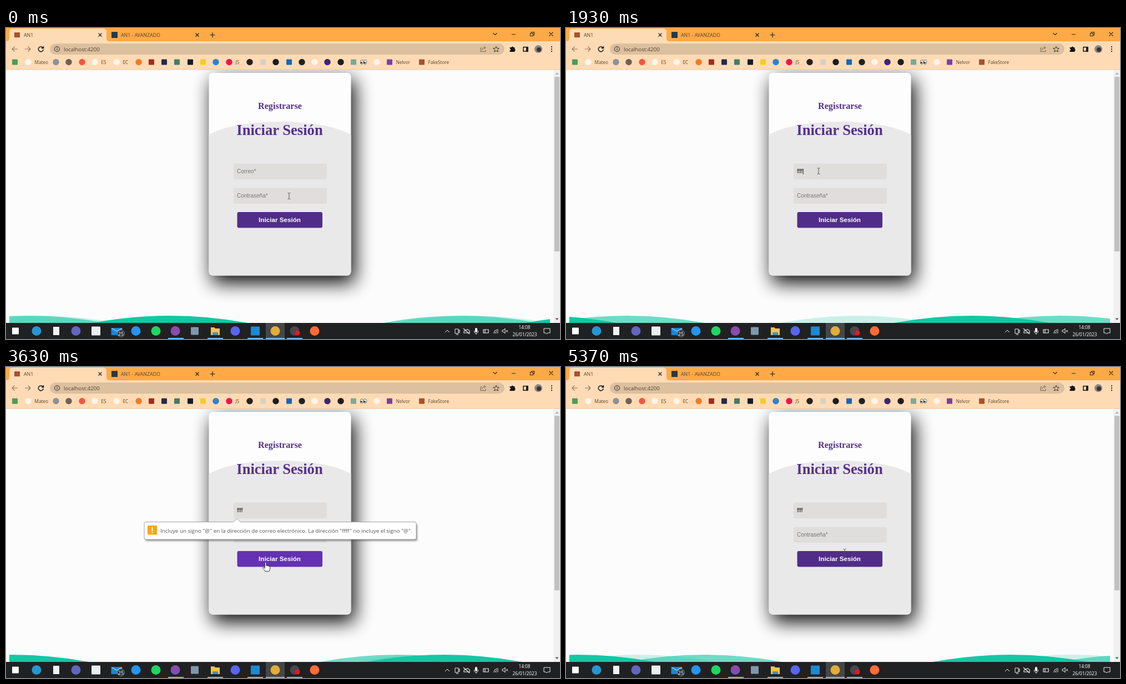
These frames come from a looping animation (998x561 px, 5.41 s). An HTML page:

```html
<!DOCTYPE html>
<html lang="es">
<head>
<meta charset="utf-8">
<title>Iniciar Sesión</title>
<style>
html, body { margin: 0; width: 100%; height: 100%; overflow: hidden; background: #fcfcfc; }
svg { display: block; width: 100vw; height: 100vh; }
text { font-family: "Open Sans", "Noto Sans", sans-serif; white-space: pre; }
.serif { font: bold 16.2px "Liberation Serif", "Times New Roman", serif; fill: #55308b; text-anchor: middle; }
.arial { font: 10px "Liberation Sans", Arial, sans-serif; }
.line { fill: none; stroke: #3b3025; stroke-width: 1.2; }
.tray { fill: none; stroke: #eee; stroke-width: 1; }
</style>
</head>
<body>
<svg viewBox="0 0 998 561">
  <defs>
    <filter id="blur" x="-30%" y="-30%" width="160%" height="160%"><feGaussianBlur stdDeviation="17"/></filter>
    <filter id="soft" x="-5%" y="-20%" width="110%" height="150%"><feGaussianBlur stdDeviation="1.5"/></filter>
    <clipPath id="card"><rect x="365.5" y="81" width="256" height="365.5" rx="7"/></clipPath>
    <clipPath id="sea"><rect x="6" y="518" width="974" height="14"/></clipPath>
  </defs>

  <!-- page -->
  <rect width="998" height="561" fill="#fcfcfc"/>
  <rect x="371" y="93" width="257" height="367" rx="7" filter="url(#blur)" opacity=".96"/>
  <g clip-path="url(#card)">
    <rect x="365" y="81" width="257" height="366" fill="#fdfdfd"/>
    <path d="M365 193C392 177 440 169 493 169S595 177 622 193V447H365Z" fill="#e9e9e9"/>
  </g>
  <text class="serif" x="493.5" y="146">Registrarse</text>
  <text class="serif" x="493" y="193" style="font-size:26.6px">Iniciar Sesión</text>
  <g fill="#dfdedd">
    <rect x="410" y="244.5" width="168" height="28.5" rx="2"/>
    <rect x="410" y="288.5" width="168" height="28.5" rx="2"/>
  </g>
  <text class="arial" id="mail" x="416" y="262"></text>
  <path id="caret" d="M.5 254v10" stroke="#444"/>
  <text class="arial" x="416" y="306" fill="#777">Contraseña*</text>
  <rect id="button" x="416.5" y="332" width="153.5" height="28.5" rx="3"/>
  <text class="arial" x="493" y="350" text-anchor="middle" fill="#fff" style="font-weight:bold;font-size:11.7px">Iniciar Sesión</text>
  <g id="waves" fill="#12c8a3" clip-path="url(#sea)">
    <path opacity=".22"/><path opacity=".6"/><path/>
  </g>
  <rect x="986" y="75" width="12" height="457" fill="#f1f1f1"/>
  <rect x="988" y="88" width="9" height="315" fill="#c1c1c1"/>
  <path d="M989.5 84l3-3.5 3 3.5z" fill="#a5a5a5"/>
  <path d="M989.5 523.500l3 3.500 3-3.500z" fill="#555"/>

  <!-- suggestions -->
  <g id="list">
    <path d="M481 280.500H485L493.500 274.500 502 280.500H631.500q3 0 3 3V439.500q0 3-3 3H481q-3 0-3-3V283.500q0-3 3-3z" fill="#3c3d3d" opacity=".95"/>
  </g>

  <!-- validation bubble -->
  <g id="bubble">
    <rect x="251" y="283" width="490" height="31" rx="3" fill="#444" opacity=".5" filter="url(#soft)"/>
    <path d="M252 279.500H409.500L416 273.500 422.500 279.500H736q3 0 3 3V308q0 3-3 3H252q-3 0-3-3V282.500q0-3 3-3z" fill="#fff" stroke="#8b8b8b" stroke-width=".8"/>
    <rect x="255" y="286" width="17" height="16.500" rx="1" fill="#f6a51c"/>
    <path d="M263.500 288.500v7.500M263.500 297.800v2" stroke="#fff" stroke-width="2"/>
    <text x="278" y="299" font-size="9.8" fill="#555">Incluye un signo "@" en la dirección de correo electrónico. La dirección "ffff" no incluye el signo "@".</text>
  </g>

  <!-- browser -->
  <rect width="998" height="25" fill="#ffa947"/>
  <rect y="24" width="998" height="51" fill="#ffdbb5"/>
  <path d="M0 24q6 0 6-6V7q0-6 6-6H175q6 0 6 6V18q0 6 6 6z" fill="#ffdbb5"/>
  <path d="M0 75h998" stroke="#e9c5a0"/>
  <rect x="79" y="28" width="819" height="20" rx="10" fill="#dcc09f"/>
  <g font-size="8.8" fill="#54432f">
    <text x="32" y="15.500">AN1</text>
    <text x="207" y="15.500">AN1 - AVANZADO</text>
    <text x="104" y="41.500" font-size="9.6">localhost:4200</text>
  </g>
  <rect x="15" y="8" width="10" height="9" fill="#a9512f"/>
  <rect x="190" y="7" width="11" height="11" fill="#273a48"/>
  <g class="line">
    <path d="M166.500 9.500l6 6m0-6l-6 6M341.500 9.500l6 6m0-6l-6 6M367.500 12.500h9m-4.500-4.500v9" stroke="#222"/>
    <path d="M877.500 9l3.500 3.500 3.500-3.500M911 11.500h7M944.500 9.500h5v5h-5zM946.500 9.500v-2h5v5h-2M978.500 7.500l7 7m0-7l-7 7"/>
    <path d="M21 38H11m4.500-4.500L11 38l4.500 4.500M34 38h10m-4.500-4.500L44 38l-4.500 4.500" stroke="#8c7559"/>
    <path d="M66.500 35.500a4.500 4.500 0 1 0 .8 3.500M67.500 33v3.500H64" stroke="#111" stroke-width="1.500"/>
    <circle cx="92" cy="38" r="4.500"/><path d="M92 37v3.500M92 35v1.200"/>
    <path d="M857 36h-2v6.500h9v-3M857.500 40q0-4.500 6-4.500m-2.500-2.500l3 2.500-3 2.500" stroke="#78654f" stroke-width="1"/>
    <path d="M883 33l1.500 3.500 3.700.3-2.800 2.500.9 3.700-3.300-2-3.300 2 .9-3.700-2.800-2.500 3.700-.3z" stroke-width="1"/>
    <path d="M932 34.500h8v7.500h-8z" stroke="#111" stroke-width="1.500"/>
  </g>
  <path d="M907.500 35h3a1.800 1.800 0 0 1 3.500 0h2.500v3a1.700 1.700 0 0 1 0 3.200v1.800h-9v-2.500a1.700 1.700 0 0 0 0-3.400zM937 34h3.500v8.500H937z" fill="#111"/>
  <circle cx="959" cy="38" r="7" fill="#8d8580"/><circle cx="960" cy="39" r="4" fill="#37313a"/>
  <path d="M983 33v2m0 2v2m0 2v2" stroke="#222" stroke-width="2"/>
  <g id="marks" font-size="8.2" fill="#54432f"></g>

  <!-- taskbar -->
  <rect y="532" width="998" height="29" fill="#202122"/>
  <rect x="468" y="532" width="34" height="29" fill="#454748"/>
  <g id="apps"></g>
  <path d="M292 560h28M363 560h28M435 560h28M468 560h34M506 560h28" stroke="#76b9ed" stroke-width="2"/>
  <path d="M190.500 542l9 5 9-5" fill="none" stroke="#d7efff"/>
  <circle cx="207" cy="551" r="6.500" fill="#303336" stroke="#aaa" stroke-width=".6"/>
  <text x="207" y="554.500" font-size="9" fill="#fff" text-anchor="middle">25</text>
  <circle cx="525" cy="550" r="4.500" fill="#f0151d"/>
  <g class="tray">
    <path d="M791 549l4-4 4 4M809 543h6v8h-6zM815 546l2-1.500v5l-2-1.500M811 553h4"/>
    <path d="M825 550q-1-4 3-4 2-4 5-1 3 0 2 5zM824 542l11 10M860 544h9v6h-9zM863 544v6" stroke-width="1.200"/>
    <path d="M879 551q0-7 8-7M881.500 551q0-4.500 5.500-4.500M884 551q0-2 3-2M894 545h2l3-3v9l-3-3h-2zM901 545l3 3.500m0-3.500l-3 3.500"/>
    <path d="M969 542h11v8h-4l-2 2-2-2h-3z"/>
    <path d="M843.500 546q0 5 3.500 5t3.500-5M847 551v2"/>
  </g>
  <rect x="845" y="541" width="4" height="8" rx="2" fill="#fff"/>
  <g font-size="8.3" fill="#fff" text-anchor="middle">
    <text x="934" y="542.500">14:08</text><text x="934.500" y="555.500">26/01/2023</text>
  </g>

  <!-- pointers -->
  <g id="pointer">
    <path d="M-2.500-5.500q2 0 2.500 1 .5-1 2.500-1M0-4.500v9M-2.500 5.500q2 0 2.500-1 .5 1 2.500 1" fill="none" stroke="#555"/>
    <path d="M-1.500 1q0-1.500 1.300-1.500t1.300 1.500v5q2-1 2.800.4 2-.6 2.400.8 1.800 0 1.800 1.800 0 4-2 7h-7q-1.500-3-4-5-1.500-2 .2-2.300 1.200 0 3.200 1.800z" fill="#fff" stroke="#222" stroke-width=".9"/>
    <path d="M0 0v12l2.800-2.500 2 4.500 1.800-.8-2-4.300h3.700z" fill="#fff" stroke="#222" stroke-width=".8"/>
  </g>
</svg>
<script>
const $ = id => document.getElementById(id);
const LOOP = 5410;

const badge = (x, y, r, color, square) => square
  ? `<rect x="${x - r}" y="${y - r}" width="${2 * r}" height="${2 * r}" rx="1" fill="${color}"/>`
  : `<circle cx="${x}" cy="${y}" r="${r}" fill="${color}"/>`;

// [x, colour, square, label]
$('marks').innerHTML = [
  [16, '#4d9b55', 1], [40, '#fff4e8', 0, 'Mateo'], [90, '#8b9299'], [113, '#6d625a'], [137, '#f2573f'],
  [160, '#fff4e8', 0, 'ES'], [199, '#fff4e8', 0, 'EC'], [239, '#f17b2b'], [262, '#a72822', 1],
  [285, '#242b4d', 1], [308, '#437b66', 1], [332, '#161d29', 1], [355, '#f2cf20', 1], [378, '#2d83cf'],
  [402, '#ee174d', 0, 'JS'], [439, '#24211f'], [463, '#d7d0c8', 1], [486, '#1d1d1f'],
  [510, '#1269bd', 1], [533, '#1b2523'], [556, '#fff4e8'], [579, '#3d2577'], [603, '#1d1d1f'],
  [626, '#74aa9c', 1], [668, '#fff4e8'], [691, '#7443a5', 1, 'Nelvor'], [749, '#a9512f', 1, 'FakeStore']
].map(([x, color, square, label]) => badge(x, 61.5, square ? 5 : 5.7, color, square) +
  (label ? `<text x="${x + 11.5}" y="64.5">${label}</text>` : '')).join('') +
  [641, 647].map(x => `<ellipse cx="${x}" cy="61.5" rx="2.6" ry="4" fill="#fff" stroke="#222" stroke-width=".7"/>` +
    badge(x - 0.7, 62.5, 1.5, '#222')).join('');

$('apps').innerHTML = [
  [17, '#fff', 1, 6], [55, '#2597d0'], [126, '#6266bd'], [162, '#e9eef2', 1, 8], [234, '#2496ed'],
  [270, '#1ed760'], [305, '#8b4bb0'], [340, '#7e98ad', 1, 7], [413, '#5865f2'], [449, '#1b8ad4', 1, 8],
  [485, '#e3ae36'], [520, '#48484b'], [556, '#ff6c37']
].map(([x, color, square, r = 8.5]) => badge(x, 546.5, r, color, square)).join('') +
  '<rect x="85" y="539" width="11" height="15" fill="#f2f2f2"/>' +
  '<rect x="189.5" y="541" width="20" height="13" fill="#1687d9"/>' +
  '<path d="M369 540h6l2 2h8v12h-16z" fill="#f6c344"/><path d="M372 549h10v5h-10z" fill="#3b8fd3"/>';

$('list').innerHTML += [
  'pabloandres.vega@orvu.test', 'pavegacastellano@orvik.test', 'tt@vu.test',
  'drtalulo@orvu.test', 'k@u.test', 'wplwp@kovmuna.test'
].map((s, i) => `<text x="487" y="${300 + 26 * i}" font-size="8.8" fill="#eee">${s}</text>`).join('');

const clamp = v => Math.max(0, Math.min(1, v));
const smooth = v => v * v * (3 - 2 * v);

// Values at time t from rows of [time, ...values]
function at(keys, t, ease = v => v) {
  const i = Math.max(1, keys.findIndex(k => k[0] >= t));
  const a = keys[i - 1], b = keys[i], p = ease(clamp((t - a[0]) / (b[0] - a[0])));
  return a.slice(1).map((v, n) => v + (b[n + 1] - v) * p);
}

const MOUSE = [[0, 510, 303], [150, 510, 303], [600, 453, 258], [1500, 453, 258], [1930, 455, 258],
  [2050, 455, 258], [2480, 483, 355], [2700, 483, 355], [3070, 482, 355], [3500, 482, 355],
  [4150, 348, 332], [4450, 348, 332], [5350, 502, 334], [LOOP, 502, 334]];
// Crest offsets of the pale, middle and strong waves
const SEA = [[0, 60, 820, 295], [1170, 190, 450, 670], [1930, 525, 110, 730], [2630, 600, 130, 1305],
  [3070, 690, 80, 1345], [4230, 860, -240, 1810], [5370, 910, -530, 2360], [LOOP, 915, -540, 2380]];
const PERIOD = 780;
const TYPED = [1130, 1290, 1420, 1550];

function wave(offset) {
  let d = '', c = ((offset % PERIOD) + PERIOD) % PERIOD - PERIOD;
  for (; c < 1140; c += PERIOD) d += `M${c - 140} 532Q${c} 506 ${c + 140} 532Z`;
  return d;
}

function draw(t) {
  at(SEA, t).forEach((offset, i) => $('waves').children[i].setAttribute('d', wave(offset)));

  const count = TYPED.filter(k => t >= k).length;
  $('mail').textContent = count ? 'f'.repeat(count) : 'Correo*';
  $('mail').setAttribute('fill', count ? '#222' : '#777');
  const caret = t < 2900 ? t > 650 && t < 2500 : t < 5000 && Math.floor((t - 2900) / 530) % 2 === 0;
  $('caret').setAttribute('opacity', +caret);
  $('caret').setAttribute('transform', `translate(${Math.floor(416 + count * 2.78)})`);

  $('list').setAttribute('opacity', clamp((t - 720) / 80) * clamp((1290 - t) / 90));

  const grow = 0.97 + 0.03 * smooth(clamp((t - 2920) / 245));
  $('bubble').setAttribute('opacity', clamp((t - 2920) / 120) * clamp((5300 - t) / 130));
  $('bubble').setAttribute('transform', `translate(493 280) scale(${grow} 1) translate(-493 -280)`);

  const [x, y] = at(MOUSE, t, smooth);
  const hover = x > 416 && x < 570 && y > 336 && y < 361;
  const field = x > 410 && x < 578 && (y > 244 && y < 273 || y > 288 && y < 336);
  const kind = hover ? 1 : field ? 0 : 2;
  [...$('pointer').children].forEach((p, i) => p.style.display = i === kind ? '' : 'none');
  $('pointer').setAttribute('transform', `translate(${x} ${y})`);
  $('button').setAttribute('fill', hover ? '#6431b3' : '#512d88');
}

const start = performance.now();
(function tick() {
  draw((performance.now() - start) % LOOP);
  requestAnimationFrame(tick);
})();
</script>
</body>
</html>
```
